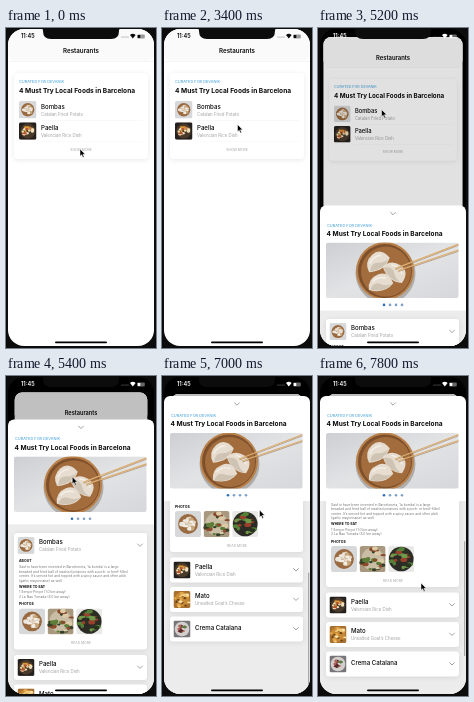
An HTML page that plays this animation: 150 by 320 pixels, repeating every 8 s.

```html
<!DOCTYPE html>
<html lang="en">
<head>
<meta charset="utf-8">
<title>Restaurants</title>
<style>
  html, body { margin: 0; width: 100%; height: 100%; overflow: hidden; background: #0c0c0d; }
  svg { display: block; }
  #stage { width: 100vw; height: 100vh; }
  text { font-family: Inter, "Liberation Sans", sans-serif; fill: #0a0a0a; }
  .title { font-size: 6.6px; font-weight: 700; }
  .nav { font-size: 6.2px; font-weight: 600; }
  .time { font-size: 5.6px; font-weight: 600; fill: inherit; }
  .tag { font-size: 3.9px; fill: #3f9fda; }
  .name { font-size: 6.1px; font-weight: 500; }
  .sub { font-size: 4.4px; fill: #a2a2a4; }
  .more { font-size: 3.4px; fill: #a4a4a6; }
  .head { font-size: 3.5px; font-weight: 700; }
  .body { font-size: 3.35px; fill: #77777a; }
  .mid { text-anchor: middle; }
  .card { fill: #fff; filter: drop-shadow(0 1px 2.5px rgba(0, 0, 0, .09)); }
  .chev { fill: none; stroke: #8a8a8d; stroke-width: .8; stroke-linecap: round; stroke-linejoin: round; }
</style>
</head>
<body>
<svg id="stage" viewBox="0 0 150 320" preserveAspectRatio="none"></svg>
<script>
const LOOP = 8000, STEP = 200;

// [time, value...] rows, linear between them
const cursorPath = [
  [0, 74, 121], [1000, 74.5, 122], [1200, 77, 139], [1400, 81.5, 167], [1800, 81.5, 167],
  [2000, 81.5, 165], [2400, 79, 144], [2800, 76.5, 121], [3400, 75.5, 96.5],
  [4000, 66, 84], [4400, 63.5, 81.5], [5200, 63.5, 81.5], [5600, 69, 120], [6000, 80, 186],
  [6200, 81.5, 196], [6400, 82, 197], [6600, 87, 182], [6800, 93, 154], [7000, 97.5, 134],
  [7200, 99, 142], [7600, 102, 192], [7800, 103, 207]
];
const growth = [[0, 0], [800, 0], [1000, .5], [1200, .98], [1400, 1], [1600, 1], [1800, .7], [2000, .1], [2200, 0]];
const scrollPath = [[0, 0], [6400, 0], [6600, 12], [6800, 49], [7000, 74], [7200, 61], [7400, 47], [7600, 40.5], [7800, 39]];

function at(rows, t) {
  const i = rows.findIndex(r => r[0] > t);
  if (i < 0) return rows[rows.length - 1].slice(1);
  const a = rows[i - 1], b = rows[i], k = (t - a[0]) / (b[0] - a[0]);
  return a.slice(1).map((v, j) => v + (b[j + 1] - v) * k);
}

// critically damped spring from 0 to 1
function spring(t, begin, rate) {
  const x = Math.max(0, t - begin) / 1000 * rate;
  return 1 - (1 + x) * Math.exp(-x);
}

const text = (x, y, cls, s) => `<text x="${x}" y="${y}" class="${cls}">${s}</text>`;
const rect = (x, y, w, h, r, rest) => `<rect x="${x}" y="${y}" width="${w}" height="${h}" rx="${r}" ${rest}/>`;
const circle = (x, y, r, fill) => `<circle cx="${x}" cy="${y}" r="${r}" ${fill ? `fill="${fill}"` : ''}/>`;
const chevron = (x, y, w = 2.4) => `<path class="chev" d="M${x - w} ${y - w / 2}l${w} ${w}l${w} ${-w}"/>`;

function random(seed) {
  return () => (seed = (seed * 16807) % 2147483647) / 2147483647;
}

// small food picture on a 20 unit square
function food(x, y, size, look) {
  const { base, plate, bits, seed, n = 16, spread = 6, rim = 8.6 } = look, rnd = random(seed * 7919);
  let s = rect(0, 0, 20, 20, 0, `fill="${base}"`) + circle(10, 10, rim, plate);
  for (let i = 0; i < n; i++) {
    const a = rnd() * 6.28, d = Math.sqrt(rnd()) * spread;
    s += `<ellipse cx="${10 + Math.cos(a) * d}" cy="${10 + Math.sin(a) * d}" rx="${1.2 + rnd() * 1.5}" ry="${.8 + rnd()}" fill="${bits[i % bits.length]}"/>`;
  }
  return `<g transform="translate(${x} ${y}) scale(${size / 20})" clip-path="url(#tile)">${s}</g>`;
}

const looks = {
  bombas: { base: '#d6d8da', plate: '#9a6a40', bits: ['#ece6dc', '#e0d4c2', '#f2eee6', '#c7a67c'], seed: 3, n: 18, spread: 4.6, rim: 7.6 },
  paella: { base: '#24201e', plate: '#4a3a2a', bits: ['#d99a35', '#efd9a5', '#b5532a', '#f0e2c0'], seed: 8, n: 20 },
  mato: { base: '#a8702f', plate: '#c98a35', bits: ['#f0c978', '#6c431f', '#e5a94c', '#fae3ad'], seed: 13, n: 22, spread: 9 },
  crema: { base: '#77757a', plate: '#d3cfcc', bits: ['#8a3038', '#b0675a', '#4f2a2c', '#5d7a45'], seed: 21, spread: 5 },
  greens: { base: '#a8987e', plate: '#c9bda6', bits: ['#5d7d38', '#8b4a2c', '#dccba6', '#33402a'], seed: 34, n: 34, spread: 9.5 },
  salad: { base: '#e9e9e7', plate: '#2d2b26', bits: ['#55803a', '#9c3f2c', '#6f9a4a', '#2a3320'], seed: 55, n: 26, spread: 8, rim: 9.5 }
};
const dishes = [
  ['bombas', 'Bombas', 'Catalan Fried Potato'],
  ['paella', 'Paella', 'Valencian Rice Dish'],
  ['mato', 'Mato', 'Unsalted Goat’s Cheese'],
  ['crema', 'Crema Catalana', '']
];
const tag = 'CURATED FOR DEVANIK', heading = '4 Must Try Local Foods in Barcelona';

function label(x, y, name, sub) {
  return text(x, y + (sub ? 0 : 2), 'name', name) + text(x, y + 7, 'sub', sub);
}

function listPage() {
  const rows = dishes.map(([key, name, sub], i) => {
    const y = 73 + i * 21.3;
    return food(13, y, 17.5, looks[key]) + label(35, y + 7.6, name, sub) +
      (i ? rect(35, y - 2, 102, .3, 0, 'fill="#ececee"') : '');
  }).join('');
  return rect(2, 1, 146, 330, 8, 'fill="#fff"') +
    rect(2, 1, 146, 32, 8, 'fill="#fafafa"') + rect(2, 33, 146, .4, 0, 'fill="#e6e6e8"') +
    text(75, 25.3, 'nav mid', 'Restaurants') +
    rect(8, 45, 134, 86, 4, 'class="card" id="card"') +
    text(13, 55, 'tag', tag) + text(13, 64.5, 'title', heading) +
    `<g clip-path="url(#rows)">${rows}</g>` +
    `<text id="toggle" x="75" class="more mid"></text>`;
}

function heroPicture() {
  const dumpling = (x, y, turn) => `<g transform="translate(${x} ${y}) rotate(${turn}) scale(1.4)">
    <path d="M-9 3Q-8-5 0-6T9 3Q1 9-9 3Z" fill="#e6ddd0"/>
    <path d="M-8 3Q-4-2 0 1T8 3Q1 8-8 3Z" fill="#cfc4b4"/>
    <path d="M-5-2Q0-5 5-2" fill="none" stroke="#f4efe7"/></g>`;
  const sticks = 'M77 83L142 58M80 85L142 64';
  return `<g clip-path="url(#hero)">
    ${rect(8, 57, 133, 56, 0, 'fill="url(#marble)"')}
    ${circle(67.5, 88, 30, '#aeadac')}${circle(67, 85.5, 29, '#b98049')}${circle(67, 85.5, 27, '#7d4f2b')}${circle(68, 86, 25, '#a36c3d')}
    ${dumpling(59, 76, -35)}${dumpling(77, 86, 40)}${dumpling(62, 97, -15)}
    <path d="${sticks}" stroke="#8a6238" stroke-opacity=".5" transform="translate(.5 1)"/>
    <path d="${sticks}" stroke="#dcae72" stroke-width="1.3"/></g>`;
}

function detailList() {
  const about = [
    'Said to have been invented in Barceloneta, ‘la bomba’ is a large',
    'breaded and fried ball of mashed potatoes with a pork- or beef-filled',
    'centre. It’s served hot and topped with a spicy sauce and often alioli',
    '(garlic mayonnaise) as well.'
  ];
  const tops = [133.5, 255.5, 285, 314.5];
  const cards = dishes.map(([key, name, sub], i) => {
    const y = tops[i];
    return rect(8, y, 133, i ? 25 : 116.5, 3, 'class="card"') +
      food(11.5, y + 4, 17, looks[key]) + label(33, y + 11.2, name, sub) + chevron(134, y + 12.3);
  }).join('');
  return cards + text(13, 162.3, 'head', 'ABOUT') +
    about.map((s, i) => text(13, 168.5 + i * 4.6, 'body', s)).join('') +
    text(13, 188.4, 'head', 'WHERE TO EAT') +
    text(13, 193.8, 'body', '1 Senyor Pinyot (1.0 km away)') +
    text(13, 198.4, 'body', '2 La Nau Torrada (4.0 km away)') +
    text(13, 205.8, 'head', 'PHOTOS') +
    ['bombas', 'greens', 'salad'].map((k, i) => food(13 + i * 28.6, 209, 26, looks[k])).join('') +
    text(75, 244.8, 'more mid', 'READ MORE');
}

function sheetPage() {
  return rect(2, 20, 146, 320, 6, 'fill="#fff"') + rect(2, 125, 146, 220, 0, 'fill="#ececed"') +
    chevron(75, 28) + text(9, 41, 'tag', tag) + text(8.5, 50.3, 'title', heading) + heroPicture() +
    [66, 72, 78, 84].map((x, i) => circle(x, 119.3, 1.3, i ? '#7f9fc4' : '#2f6db5')).join('') +
    `<g clip-path="url(#list)"><g id="list-items">${detailList()}</g></g>` +
    rect(146, 130, 1.2, 115, .6, 'id="bar" fill="#555"');
}

const stage = document.getElementById('stage');
stage.innerHTML = `
<defs>
  <clipPath id="screen">${rect(2, 1, 146, 317, 16, '')}</clipPath>
  <clipPath id="tile">${rect(0, 0, 20, 20, 2, '')}</clipPath>
  <clipPath id="hero">${rect(8, 57, 132.5, 55.5, 2, '')}</clipPath>
  <clipPath id="list">${rect(2, 125, 146, 320, 0, '')}</clipPath>
  <clipPath id="rows">${rect(8, 70, 134, 45, 0, 'id="rows-box"')}</clipPath>
  <linearGradient id="marble" x2="1" y2="1">
    <stop stop-color="#cdcfd2"/><stop offset=".5" stop-color="#e2e3e5"/><stop offset="1" stop-color="#d6d7da"/>
  </linearGradient>
</defs>
<g clip-path="url(#screen)">
  ${rect(0, 0, 150, 320, 0, 'fill="#000"')}
  <g id="page">${listPage()}${rect(2, 1, 146, 330, 8, 'id="dim"')}</g>
  <g id="sheet">${sheetPage()}</g>
  <g id="status">
    ${text(15, 10.4, 'time', '11:45')}
    <g opacity=".5">${[116, 118, 120, 122].map(x => circle(x, 9, .6)).join('')}</g>
    <path d="M124 7q2.8-2.4 5.6 0l-2.8 3.6z"/>
    ${rect(131.2, 6.4, 7.6, 4, 1, 'fill-opacity=".4"')}${rect(131.7, 6.9, 2.6, 3, .6, '')}
  </g>
  ${rect(49, 313.4, 52, 1.9, .95, 'fill="#000"')}
</g>
<path d="M34 0H116Q113 0 113 3Q113 11 105 11H45Q37 11 37 3Q37 0 34 0Z" fill="#0c0c0d"/>
<path id="cursor" d="M0 0V7.2L1.7 5.7L2.9 8.4L4.1 7.9L2.9 5.3H5.2Z" fill="#000" stroke="#fff" stroke-width=".5"/>`;

const el = id => document.getElementById(id);
const set = (id, key, v) => el(id).setAttribute(key, v);
const move = (id, x, y) => set(id, 'transform', `translate(${x} ${y})`);

function render(t) {
  const [cx, cy] = at(cursorPath, t), [grow] = at(growth, t), [scroll] = at(scrollPath, t);
  const up = spring(t, 5077, 13);
  move('cursor', cx, cy);

  set('card', 'height', 86 + 41 * grow);
  set('rows-box', 'height', 45 + 41.5 * grow);
  set('toggle', 'y', 123 + 42.3 * grow);
  el('toggle').textContent = t >= 1000 && t < 1800 ? 'SHOW LESS' : 'SHOW MORE';

  const size = 1 - .1 * up;
  set('page', 'transform', `translate(${75 * (1 - size)} ${17 * up}) scale(${size})`);
  set('dim', 'opacity', .25 * up);
  set('status', 'fill', up > .1 ? '#fff' : '#0a0a0a');

  move('sheet', 0, 300 * (1 - up));
  move('list-items', 0, -scroll);
  move('bar', 0, scroll * .9);
  set('bar', 'opacity', scroll > 0 ? .45 : 0);
}

const start = performance.now();
function tick() {
  const t = (performance.now() - start) % LOOP;
  render(Math.floor(t / STEP) * STEP);
  requestAnimationFrame(tick);
}
tick();
</script>
</body>
</html>
```
